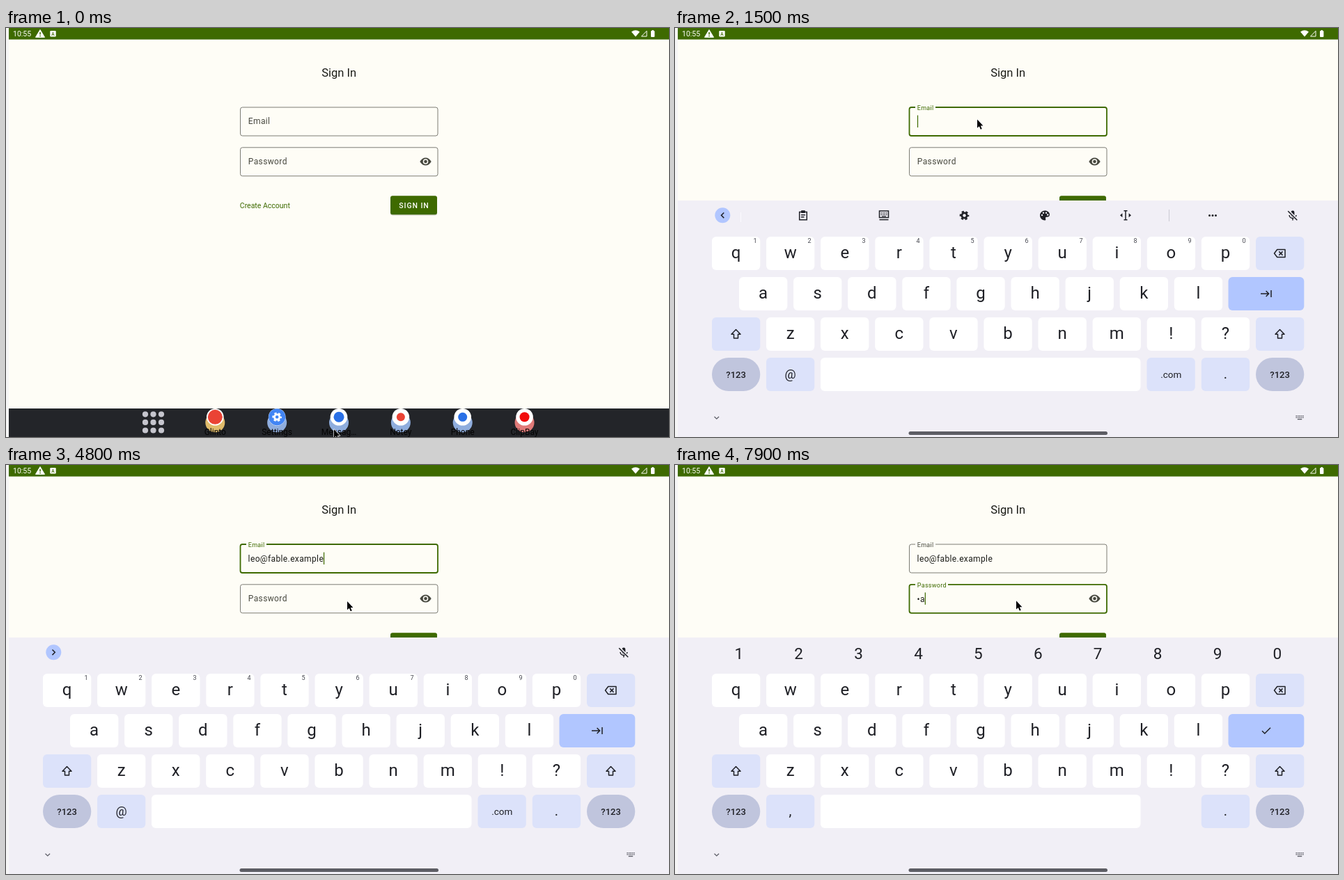
Animation of 952 by 588 pixels, one loop 8 s. Source, as an HTML page:

```html
<!DOCTYPE html>
<html lang="en">
<head>
<meta charset="utf-8">
<title>Sign In</title>
<style>
html, body { margin: 0; width: 100%; height: 100%; overflow: hidden; background: #f6f6f6; }
svg { display: block; width: 952px; height: 588px; font-family: Roboto, "Noto Sans", sans-serif; }
.line { fill: none; stroke: #1f2026; stroke-width: 1.5; }
.mid { text-anchor: middle; }
text { white-space: pre; }
</style>
</head>
<body>
<svg id="stage" viewBox="0 0 952 588"></svg>
<script>
const GREEN = '#3e6a00', PAPER = '#fefdf6', INK = '#1f2026', GREY = '#47483f';
const LOOP = 8000, STEP = 100;
const MAIL = 'leo@fable.example';

const rect = (x, y, w, h, fill, r = 0, more = '') =>
  `<rect x="${x}" y="${y}" width="${w}" height="${h}" rx="${r}" fill="${fill}" ${more}/>`;
const circle = (x, y, r, fill, more = '') =>
  `<circle cx="${x}" cy="${y}" r="${r}" fill="${fill}" ${more}/>`;
const text = (x, y, size, str, fill = INK, more = 'class="mid"') =>
  `<text x="${x}" y="${y}" font-size="${size}" fill="${fill}" ${more}>${str}</text>`;
const at = (x, y, inner) => `<g transform="translate(${x} ${y})">${inner}</g>`;
const line = (d, more = '') => `<path class="line" d="${d}" ${more}/>`;
const shape = (d, fill = INK, more = '') => `<path d="${d}" fill="${fill}" ${more}/>`;
const group = (id, inner, more = '') => `<g id="${id}" ${more}>${inner}</g>`;
const bold = 'class="mid" font-weight="500"';

function gear(x, y, color, s = 1) {
  const ring = (r, w, dash) =>
    `<circle r="${r}" fill="none" stroke="${color}" stroke-width="${w}" ${dash}/>`;
  return `<g transform="translate(${x} ${y}) scale(${s})">` +
    ring(3.7, 2.8, '') + ring(5.7, 2.2, 'stroke-dasharray="3.2 2.77" stroke-dashoffset="1.6"') + '</g>';
}

function statusBar() {
  return rect(4, 0, 948, 16.5, GREEN) +
    text(10, 11.8, 10.5, '10:55', '#fff', '') +
    shape('M49 2.5L55.5 13.3H42.5Z', '#fff', 'stroke="#fff" stroke-linejoin="round"') +
    shape('M48.3 6h1.5v3.6h-1.5zM48.3 10.7h1.5v1.5h-1.5z', GREEN) +
    rect(63.3, 4, 8.4, 8.4, '#fff', 1.2) + text(67.5, 10.7, 6.6, 'A', GREEN, bold) +
    shape('M898 5.6Q904 .9 910 5.6L904 12.6Z', '#fff') +
    `<path d="M912.5 12L920 4.3V12Z" fill="none" stroke="#fff"/>` +
    rect(926, 4, 5.4, 9, '#fff', 1) + rect(927.6, 3, 2.2, 2, '#fff');
}

function field(id, y, label) {
  return rect(336.5, y + .5, 283.5, 41, 'none', 3, `id="${id}Box"`) +
    rect(345, y - 2, id === 'mail' ? 29 : 47, 5, PAPER, 0, `id="${id}Gap"`) +
    text(347.8, y + 24.3, 12, label, GREY, `id="${id}Label"`) +
    text(347.6, y + 25.4, 12, '', '#1b1c18', `id="${id}Text" letter-spacing=".375"`) +
    rect(348, y + 12, 1.2, 17.5, GREEN, 0, `id="${id}Caret"`);
}

function form() {
  const eye = shape('M-8.2 0Q-5-5.6 0-5.6T8.2 0Q5 5.6 0 5.6T-8.2 0Z', GREY) +
    circle(0, 0, 3.8, PAPER) + circle(0, 0, 2.3, GREY);
  return text(478.2, 69.7, 16.5, 'Sign In', '#1b1c18') +
    field('mail', 113.5, 'Email') + field('pass', 171.3, 'Password') + at(602.5, 192, eye) +
    text(335.8, 259.2, 10.5, 'Create Account', GREEN, '') +
    rect(552, 242.5, 67, 27, '#0000002e', 3) + rect(552, 241.3, 67, 27, GREEN, 3) +
    text(586, 258.9, 10.5, 'SIGN IN', '#fff', bold + ' letter-spacing=".94"');
}

function taskbar() {
  let out = rect(4, 547, 948, 41, '#232529');
  for (let i = 0; i < 9; i++)
    out += circle(200 + 11.5 * (i % 3), 555.3 + 11.6 * Math.floor(i / 3), 4.1, '#c6c6ce');
  const apps = [
    ['Glinto', '#dfbb6b', '#ea4335', 10.5], ['Settings', '#8faddd', '#4285f4', 12],
    ['Messag…', '#8faddd', '#2a70e6', 7.5], ['Notey', '#8faddd', '#ea4335', 6],
    ['Phone', '#8faddd', '#2a70e6', 6.5], ['ClipBay', '#e07a78', '#f20d0d', 7]
  ];
  apps.forEach(([name, back, front, r], i) => {
    const x = 300.3 + 88.85 * i;
    out += circle(x, 567.3, 14, back) + circle(x, 559.3, 12.3, '#fff') + circle(x, 559.3, r, front);
    if (i === 1) out += gear(x, 559.3, '#fff');
    out += text(x, 585.2, 12, name, '#050505');
  });
  return `<g clip-path="url(#barClip)">${out}</g>`;
}

function keys() {
  const SOFT = '#dce2fa', PILL = '#c0c5dd', P = 78.1;
  const key = (x, y, w = 69.3, fill = '#fff', r = 6) => rect(x, y, w, 48, fill, r);
  const letters = (str, x, y, base) => [...str].map((c, i) =>
    key(x + P * i, y) + text(x + P * i + 34.6, base, 24, c)).join('');
  const shift = line('M0-6.5L6.5.2H3V6H-3V.2H-6.5Z', 'stroke-linejoin="round"');
  const erase = line('M-3.8-5.5H7.5V5.5H-3.8L-8 0Z', 'stroke-linejoin="round"') + line('M-1.2-2.6L4 2.6M4-2.6L-1.2 2.6');
  const tab = line('M-8 0H3.6M-.4-4L3.6 0L-.4 4M7-5V5');
  let out = letters('qwertyuiop', 53, 300, 330.5) + letters('asdfghjkl', 92, 358, 388.5) +
    letters('zxcvbnm!?', 131, 416, 446.7);
  out += key(834, 300, 69.3, SOFT) + at(868.5, 324, erase) + key(794.5, 358, 108.8, '#b1c6ff') +
    key(53, 416, 69.3, SOFT) + at(87.5, 440, shift) + key(834, 416, 69.3, SOFT) + at(868.5, 440, shift);
  for (const x of [53, 834])
    out += key(x, 474, 69.3, PILL, 24) + text(x + 34.6, 502.8, 13, '?123', INK, bold);
  out += key(131, 474, 69.3, SOFT) + key(209, 474, 459.5) + key(755.8, 474, 69.3, SOFT) +
    text(790.5, 504, 20, '.');
  const digits = [...'1234567890'];
  out += group('mailKeys',
    digits.map((c, i) => text(115 + 78 * i, 309.2, 9, c, '#45464f')).join('') +
    text(165.5, 503.5, 18, '@') + key(677.5, 474, 69.3, SOFT) + text(712.3, 502.8, 13.5, '.com') +
    at(849, 382, tab));
  out += group('passKeys',
    digits.map((c, i) => text(91.8 + 85.9 * i, 279, 22.5, c)).join('') +
    text(165.5, 504, 20, ',') + at(849, 382, line('M-6 .2L-2.2 4L6-4.2')));
  return out;
}

function strip() {
  const chevron = (id, d) => group(id, circle(68.3, 269.3, 11, '#b1c6ff') + line(d));
  const sep = x => rect(x, 261, 1, 17, '#cbcad4');
  const clip = line('M-5.3-5H5.3V6.2H-5.3Z') + rect(-3, -7.3, 6, 3.8, INK, 1) + line('M-3-.8H3M-3 2.3H1.5');
  let board = line('M-6.5-6H6.5V3.5H-6.5Z') + line('M-6.5 6.6H6.5');
  for (let i = 0; i < 8; i++) board += rect(-4.4 + 2.5 * (i % 4), -3.8 + 2.5 * Math.floor(i / 4), 1.4, 1.4, INK);
  board += rect(-3, 1.2, 6, 1.2, INK);
  const palette = shape('M0-7A7 7 0 1 0 0 7C2 7 1.2 5 1 4C.9 2.6 2 2.3 3 2.3C5.5 2.3 7 1 7-1C7-4.5 4-7 0-7Z') +
    [[-4, -.5], [-2, -3.8], [2, -3.8], [4.2, -1]].map(([x, y]) => circle(x, y, 1.2, '#f1eff6')).join('');
  const beam = line('M-2.5-6.5H2.5M-2.5 6.5H2.5M0-6.5V6.5') + shape('M-8 0L-4.6-3V3ZM8 0L4.6-3V3Z');
  const mic = rect(-2.4, -7, 4.8, 9, INK, 2.4) + line('M-5-.5Q-4.4 4 0 4T5-.5M0 4V7') +
    line('M-6.5-7L6.5 6.5', 'style="stroke:#f1eff6;stroke-width:3.4"') + line('M-6.8-6.3L6.3 6.8');
  const dots = [-4.5, 0, 4.5].map(x => circle(x, 0, 1.5, INK)).join('');
  return chevron('back', 'M70.3 265.5L66.5 269.3L70.3 273.1') +
    chevron('more', 'M66.5 265.5L70.3 269.3L66.5 273.1') +
    group('tools', rect(94, 265, 1, 14, '#fbfaff') + at(184, 269.5, clip) + at(300, 269, board) +
      gear(415.5, 269.5, INK) + at(531, 269.5, palette) + at(647, 269.3, beam) + sep(709) + at(772, 269.5, dots)) +
    group('words', text(212, 275.8, 16, 'le', INK, 'class="mid" id="typed"') + sep(336.5) + sep(616.8) +
      text(477, 264.5, 15, 'leoharts2', INK, bold) + text(477, 280.8, 11, '@mail.test') +
      text(741.5, 264.5, 15, 'leo', INK, bold) + text(741.5, 280.8, 11, '@fable.example')) +
    group('mic', at(887, 269.5, mic));
}

function footer() {
  let pad = '';
  for (let i = 0; i < 10; i++)
    pad += rect(-5.5 + 2.4 * (i % 5), -3 + 2.3 * Math.floor(i / 5), 1.5, 1.4, '#5c5d66');
  return line('M56.5 558.8L59.8 562L63.1 558.8', 'style="stroke:#5c5d66;stroke-width:1.2"') +
    at(897, 560, pad + rect(-3.2, 1.8, 6.4, 1.4, '#5c5d66'));
}

document.getElementById('stage').innerHTML =
  `<clipPath id="barClip"><rect x="4" y="547" width="948" height="41"/></clipPath>
   <clipPath id="formClip"><rect id="formArea" x="4" y="0" width="948" height="547"/></clipPath>` +
  rect(4, 0, 948, 588, PAPER) + statusBar() + group('form', form(), 'clip-path="url(#formClip)"') + taskbar() +
  group('board', rect(4, 248, 948, 400, '#f1eff6') + strip() + keys() + footer()) +
  rect(335.5, 580, 285.5, 5, '#5d5d64', 2.5, 'id="handle"') +
  group('mouse', shape('M0 0V12.2L2.8 9.7L4.8 14.3L6.7 13.4L4.8 9H8.4Z', '#000',
    'stroke="#fff" stroke-width="1.3" paint-order="stroke" stroke-linejoin="round"'));

const el = id => document.getElementById(id);
const set = (id, o) => { for (const k in o) el(id).setAttribute(k, o[k]); };
const show = (id, on) => { el(id).style.display = on ? '' : 'none'; };
const clamp = v => Math.max(0, Math.min(1, v));
const mix = (a, b, p) => a + (b - a) * p;
// last value in [time, value] pairs that has begun
const pick = (table, t) => table.reduce((v, [start, next]) => t >= start ? next : v, table[0][1]);

// [from, to, x, y]: glide to a point
const MOVES = [[0, 800, 434, 131.5], [2600, 3300, 733, 275], [3800, 4200, 492, 198],
  [4300, 4400, 491, 197], [4500, 4600, 490, 196], [5400, 5500, 490, 195.3]];
const MAIL_TEXT = [[0, ''], [2000, 'l'], [2100, 'leo'], [3400, MAIL]];
const MAIL_CARET = [[0, 0], [1100, 1], [1600, 0], [2000, 1], [2700, 0], [3200, 1], [3900, 0], [4400, 1], [4900, 0]];
const PASS_TEXT = [[0, ''], [7100, 'a'], [7900, '•a']];
const PASS_CARET = [[0, 0], [5000, 1], [5500, 0], [6000, 1], [6500, 0], [7000, 1], [7600, 0], [7900, 1]];
const RISE = [[0, 340], [1200, 185], [1300, 55], [1400, 12], [1500, 0]];

function mouseAt(t) {
  let x = 471, y = 577;
  for (const [from, to, mx, my] of MOVES) {
    const p = clamp((t - from) / (to - from)), e = p * p * (3 - 2 * p);
    x = mix(x, mx, e);
    y = mix(y, my, e);
  }
  return `translate(${x.toFixed(1)} ${y.toFixed(1)})`;
}

function drawField(id, y, focus, lift, value, caret, composing) {
  set(id + 'Box', { stroke: focus ? GREEN : '#7c7c75', 'stroke-width': focus ? 1.8 : 1 });
  const size = mix(12, 9, lift);
  set(id + 'Label', { y: mix(y + 24.6, y + 4.7, lift), 'font-size': size,
    'letter-spacing': size * .03125, fill: focus ? GREEN : GREY });
  show(id + 'Gap', lift > .5);
  const label = el(id + 'Text');
  if (label.textContent !== value) label.textContent = value;
  label.setAttribute('text-decoration', composing ? 'underline' : 'none');
  show(id + 'Caret', caret);
  set(id + 'Caret', { x: value ? 347.4 + label.getComputedTextLength() : 347.9 });
}

function draw(now) {
  const t = Math.floor(now % LOOP / STEP) * STEP;
  const inMail = t >= 1100 && t < 5000, inPass = t >= 5000;
  drawField('mail', 113.5, inMail, clamp((t - 1000) / 120), pick(MAIL_TEXT, t),
    pick(MAIL_CARET, t), t >= 2000 && t < 3400);
  drawField('pass', 171.3, inPass, clamp((t - 4900) / 120), pick(PASS_TEXT, t), pick(PASS_CARET, t), false);

  const open = t >= 1200, secret = t >= 5100;
  set('formArea', { height: open ? 249 : 547 });
  show('board', open);
  set('board', { transform: `translate(0 ${pick(RISE, t)})` });
  show('handle', t >= 1300);
  set('handle', { fill: t < 1400 ? '#f9f8fc' : '#5d5d64' });
  show('mailKeys', !secret);
  show('passKeys', secret);
  show('back', t < 2000);
  show('tools', t < 2000);
  show('more', t >= 2000 && !secret);
  show('words', t >= 2000 && t < 3400);
  show('mic', !secret);
  set('mouse', { transform: mouseAt(t) });
}

const start = performance.now();
function tick() {
  draw(performance.now() - start);
  requestAnimationFrame(tick);
}
tick();
</script>
</body>
</html>
```
